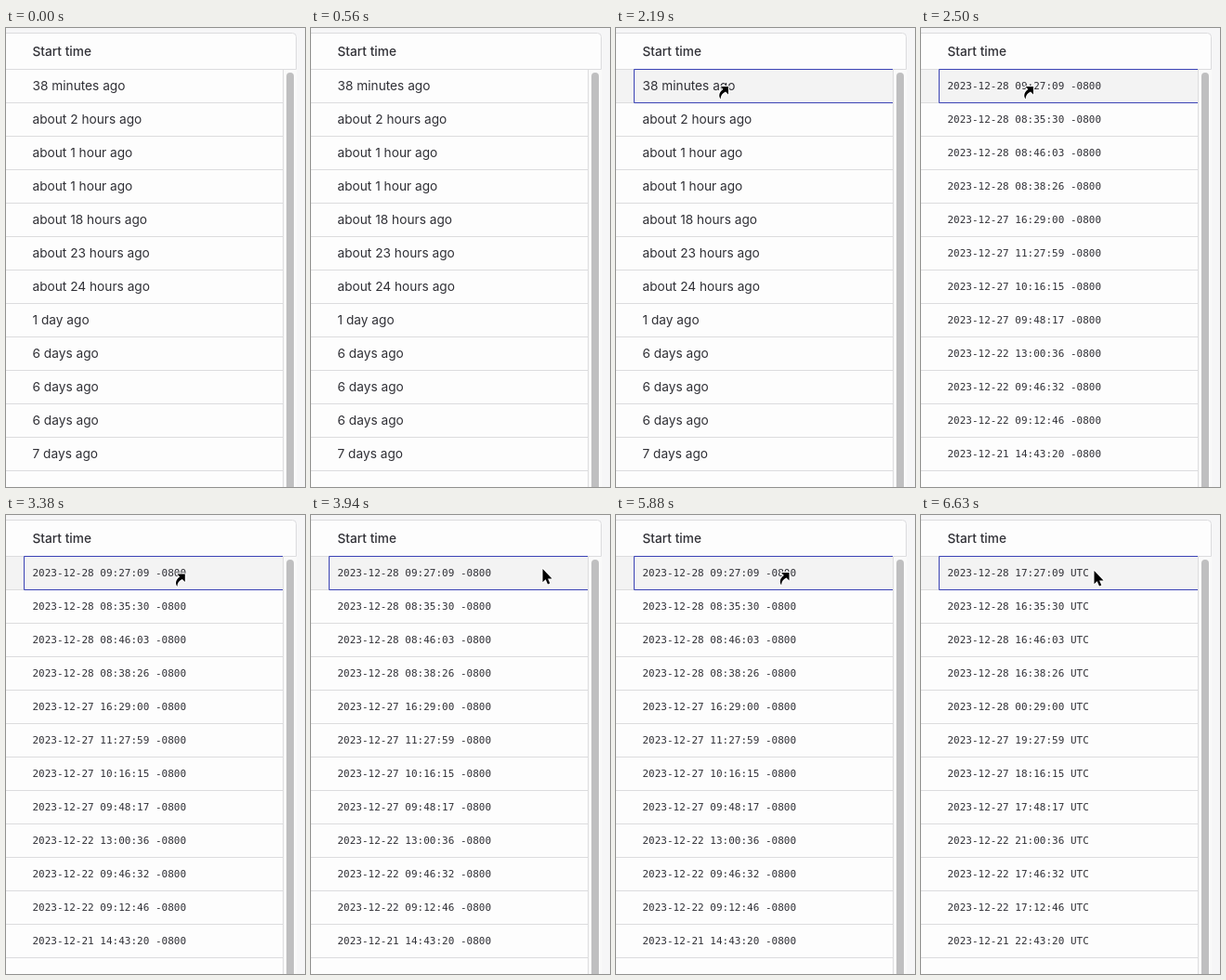
Write an HTML page that moves like this. It is 322 by 494 pixels and loops after 8000 ms.

```html
<!DOCTYPE html>
<html lang="en">
<head>
<meta charset="utf-8">
<title>Start time column</title>
<style>
  html, body { margin: 0; width: 100%; height: 100%; overflow: hidden; background: #f6f6f7; }
  svg { display: block; width: 322px; height: 494px; }
  text { font: 13.7px Inter, sans-serif; fill: #303036; white-space: pre; }
  .head { font-weight: 500; }
  .mono { font: 11px "DejaVu Sans Mono", monospace; }
  .line { fill: none; stroke: #dcdcde; }
  .cursor { fill: #000; stroke: #fff; stroke-width: 2; stroke-linejoin: round; paint-order: stroke; }
</style>
</head>
<body>
<svg viewBox="0 0 322 494">
  <path d="M0 5.5H308.5Q312.5 5.5 312.5 9.5V494H0Z" fill="#fdfdfd"/>
  <path d="M299 45H313V494H299Z" fill="#fafafa"/>
  <rect id="hover" y="45" width="298" height="35" fill="#f3f3f3"/>
  <path class="line" d="M0 5.5H308.5Q312.5 5.5 312.5 9.5V44.5H0M298.5 45V494"/>
  <path class="line" id="rules"/>
  <rect x="302" y="48" width="8" height="460" rx="4" fill="#bfbfc0"/>
  <path id="focus" d="M298 44.5H19.5V80.5H298" fill="none" stroke="#3b43b5"/>
  <text class="head" x="28.5" y="30">Start time</text>
  <g id="rows"></g>
  <path id="arrow" class="cursor" d="M0 0V14.3L3.2 11.3 5.5 16.4 7.8 15.4 5.6 10.4H10Z"/>
  <path id="alias" class="cursor" d="M0 0H-8.5L-5.6 2.9C-9.5 5.6 -11 9.5 -8.4 13.5C-8.4 10 -6.6 7.4 -3 5.6L0 8.5Z"/>
</svg>
<script>
const $ = id => document.getElementById(id);
const LOOP = 8000, ROW = 36;
const CLICK = 2000, LOCAL = 2500, UTC = 6190, ENTER = 880;

const relative = ['38 minutes', 'about 2 hours', 'about 1 hour', 'about 1 hour',
  'about 18 hours', 'about 23 hours', 'about 24 hours', '1 day',
  '6 days', '6 days', '6 days', '7 days'];
const stamps = ['28 17:27:09', '28 16:35:30', '28 16:46:03', '28 16:38:26',
  '28 00:29:00', '27 19:27:59', '27 18:16:15', '27 17:48:17',
  '22 21:00:36', '22 17:46:32', '22 17:12:46', '21 22:43:20']
  .map(s => Date.parse('2023-12-' + s.replace(' ', 'T') + 'Z'));

const format = (stamp, hours, zone) =>
  new Date(stamp + hours * 3600000).toISOString().slice(0, 19).replace('T', ' ') + ' ' + zone;

// Each mode: the cell texts and the right edge of the first one
const modes = [
  { texts: relative.map(s => s + ' ago'), edge: 129 },
  { texts: stamps.map(s => format(s, -8, '-0800')), edge: 195 },
  { texts: stamps.map(s => format(s, 0, 'UTC')), edge: 182 }
];

// Pointer path: time, x, y
const path = [
  [880, 318, 12], [1000, 235, 36], [1190, 127.5, 65], [1560, 121, 63],
  [3130, 121, 63], [3380, 192.5, 63.5], [3630, 261, 62], [3880, 253, 60], [3940, 249.5, 58],
  [4800, 249.5, 58], [4880, 241, 60], [5050, 241, 60], [5250, 219.5, 64],
  [5500, 195.5, 66], [5750, 186.5, 62], [6550, 186.5, 62], [6630, 186.5, 60]
];

function pointer(t) {
  const i = path.findIndex(p => p[0] > t);
  if (i < 0) return path[path.length - 1].slice(1);
  if (i === 0) return path[0].slice(1);
  const a = path[i - 1], b = path[i], k = (t - a[0]) / (b[0] - a[0]);
  return [a[1] + (b[1] - a[1]) * k, a[2] + (b[2] - a[2]) * k];
}

const cells = relative.map((_, i) => {
  const cell = document.createElementNS('http://www.w3.org/2000/svg', 'text');
  cell.setAttribute('x', 28.5);
  return $('rows').appendChild(cell);
});
$('rules').setAttribute('d', cells.map((_, i) => `M0 ${80.5 + i * ROW}H298`).join(''));

let shown = -1;
function setMode(mode) {
  if (mode === shown) return;
  shown = mode;
  cells.forEach((cell, i) => {
    cell.textContent = modes[mode].texts[i];
    cell.setAttribute('class', mode ? 'mono' : '');
    cell.setAttribute('y', (mode ? 66 : 67) + i * ROW);
  });
}

const show = (id, on) => $(id).setAttribute('visibility', on ? 'visible' : 'hidden');

function draw(t) {
  const mode = t < LOCAL ? 0 : t < UTC ? 1 : 2;
  const [x, y] = pointer(t);
  const inside = t >= ENTER, hover = inside && y > 45 && x < 298;
  const link = hover && x < modes[mode].edge;
  setMode(mode);
  show('hover', hover);
  show('focus', t >= CLICK);
  show('alias', link);
  show('arrow', inside && !link);
  for (const id of ['alias', 'arrow']) $(id).setAttribute('transform', `translate(${x} ${y})`);
}

const start = performance.now();
function frame(now) {
  draw(Math.max(0, now - start) % LOOP);
  requestAnimationFrame(frame);
}
draw(0);
requestAnimationFrame(frame);
</script>
</body>
</html>
```
